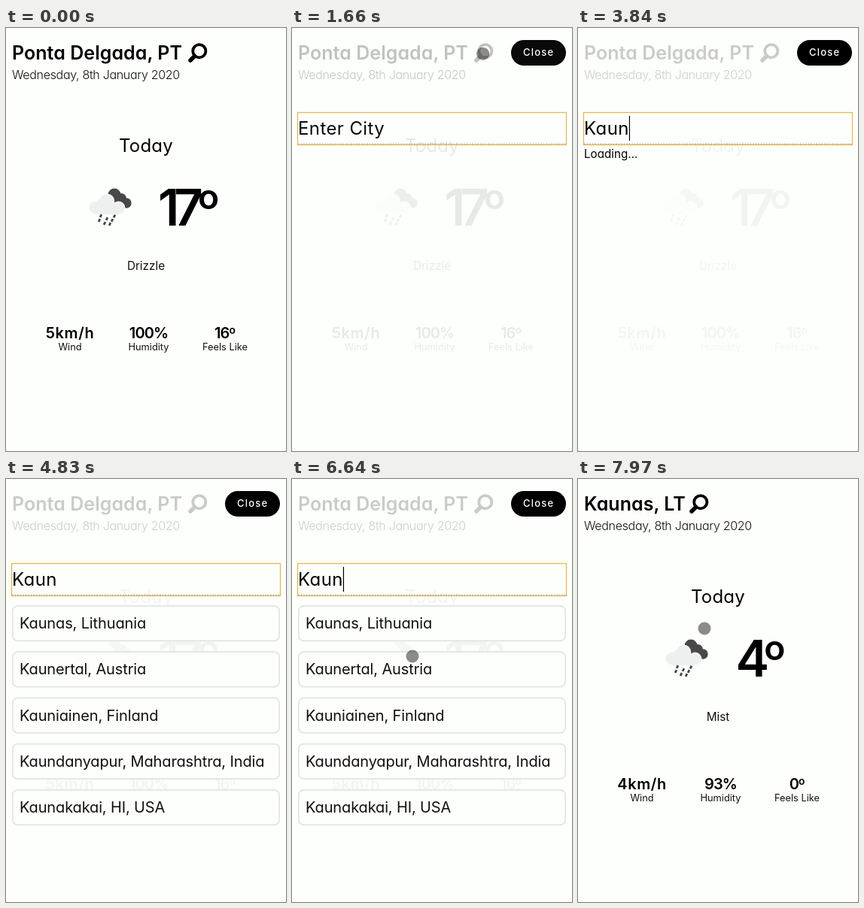
An HTML page that plays this animation: 372 by 563 pixels, repeating every 8000 ms.

```html
<!DOCTYPE html>
<html lang="en">
<head>
<meta charset="utf-8">
<title>Weather</title>
<style>
  html, body { margin: 0; width: 100%; height: 100%; overflow: hidden; background: #fdfffc; }
  svg { display: block; width: 372px; height: 563px; }
  text { font-family: Inter, "Open Sans", sans-serif; font-feature-settings: "cv11"; white-space: pre; }
</style>
</head>
<body>
<svg id="stage" viewBox="0 0 372 563">
  <defs>
    <radialGradient id="halo">
      <stop offset="0" stop-color="#aaa" stop-opacity=".4"/>
      <stop offset=".45" stop-color="#777" stop-opacity=".55"/>
      <stop offset=".62" stop-color="#bbb" stop-opacity=".7"/>
      <stop offset=".84" stop-color="#888" stop-opacity=".6"/>
      <stop offset="1" stop-color="#aaa" stop-opacity="0"/>
    </radialGradient>
  </defs>
  <g id="header"></g>
  <g id="main"></g>
  <g id="search"></g>
  <circle id="press" cx="254" cy="34" r="21" fill="url(#halo)"/>
  <circle id="pointer" r="8.5" fill="#000" fill-opacity=".45"/>
</svg>
<script>
const LOOP = 8000;
const PAPER = '#fdfffc';
const $ = id => document.getElementById(id);

const text = (x, y, content, size, { weight = 400, spacing = 0, anchor = 'start', fill = '#000', id = '' } = {}) =>
  `<text id="${id}" x="${x}" y="${y}" font-size="${size}" font-weight="${weight}" letter-spacing="${spacing}" text-anchor="${anchor}" fill="${fill}">${content}</text>`;
const centered = (x, y, content, size, options = {}) => text(x, y, content, size, { anchor: 'middle', ...options });
const degrees = n => `${n}<tspan font-size=".69em" dy="-.47em" letter-spacing="0">o</tspan>`;
const circles = list => list.map(([x, y, r]) => `<circle cx="${x}" cy="${y}" r="${r}"/>`).join('');

const cloud = x => {
  const front = circles([[119, 239, 8.3], [134, 230.5, 9.5], [126, 234, 6.5], [149.5, 239.5, 8.3]]) +
    '<rect x="119" y="234" width="30" height="13.8"/>';
  const drops = [[126, 250], [124, 256], [134, 254], [131, 260], [144, 250.5], [141, 256], [138, 261]]
    .map(([dx, dy]) => `M${dx + .9} ${dy - 1.8}l-1.8 3.6`).join('');
  return `<g transform="translate(${x - 111})">
    <g fill="#484848">${circles([[144, 222, 8.5], [153, 227, 7], [160, 233, 6.7], [152, 232, 8]])}</g>
    <g fill="${PAPER}" stroke="${PAPER}" stroke-width="1.2">${front}</g>
    <g fill="#eeefef">${front}</g>
    <path d="${drops}" stroke="#444" stroke-width="2.8"/></g>`;
};

const stat = (x, value, label, spacing = -.9) =>
  centered(x, 413, value, 20, { weight: 600, spacing }) +
  centered(x, 429, label, 12.8, { fill: '#111' });

const cities = [
  { name: 'Ponta Delgada, PT', iconX: 242, cloudX: 111, temp: 17, sky: 'Drizzle', wind: 5, humidity: 100, feels: 16 },
  { name: 'Kaunas, LT', iconX: 148, cloudX: 117, temp: 4, sky: 'Mist', wind: 4, humidity: 93, feels: 0 }
];

function showCity(c) {
  $('header').innerHTML =
    text(8, 42, c.name, 25, { weight: 600, spacing: .05 }) +
    text(8, 68, 'Wednesday, 8th January 2020', 16, { weight: 300, spacing: -.32, fill: '#111' }) +
    `<g transform="translate(${c.iconX} 20)" fill="none" stroke="#000">
      <circle cx="14.8" cy="10.7" r="8.6" stroke-width="3.8"/>
      <path d="M8.5 17.5L3 23" stroke-width="5.5" stroke-linecap="round"/></g>`;
  $('main').innerHTML =
    centered(186, 165, 'Today', 24, { spacing: .2 }) +
    cloud(c.cloudX) +
    centered(242.5, 263, degrees(c.temp), 67, { weight: 560, spacing: -7 }) +
    centered(186, 322, c.sky, 15.3, { fill: '#111' }) +
    stat(85, c.wind + 'km/h', 'Wind', .6) +
    stat(189.5, c.humidity + '%', 'Humidity') +
    stat(291, degrees(c.feels), 'Feels Like');
}

const matches = ['Kaunas, Lithuania', 'Kaunertal, Austria', 'Kauniainen, Finland',
  'Kaundanyapur, Maharashtra, India', 'Kaunakakai, HI, USA'];

$('search').innerHTML =
  '<rect x="291" y="16" width="73" height="34" rx="17"/>' +
  text(307, 37.3, 'Close', 13, { weight: 500, spacing: 1.2, fill: '#fff' }) +
  '<path d="M8 154.3H364" stroke="#99a" stroke-dasharray="2 1.5"/>' +
  '<rect x="7.5" y="112.5" width="357" height="43" fill="none" stroke="#e6b850" stroke-width="1.3"/>' +
  text(8, 142, '', 24, { id: 'query', spacing: .4 }) +
  '<rect id="caret" y="117" width="1.2" height="33"/>' +
  text(8, 173, 'Loading...', 15.2, { id: 'loading' }) +
  '<g id="results">' + matches.map((match, i) => {
    const y = 168 + i * 61.25;
    return `<rect x="8.8" y="${y + .8}" width="354.4" height="46.6" rx="7" fill="${PAPER}" stroke="#e2e4e3" stroke-width="1.7"/>` +
      text(18, y + 31, match, 20, { spacing: -.13, fill: '#111' });
  }).join('') + '</g>';

const keyTimes = [3300, 3450, 3640, 3840];
const pointerPath = [
  [100, 195, 574], [1030, 254, 34], [1650, 254, 34], [2050, 129, 135],
  [3040, 129, 135], [5330, 138, 154], [5770, 138, 154], [6600, 160, 236],
  [6780, 160, 236], [6970, 168, 199], [LOOP, 168, 199]
];

const ramp = (t, from, to) => {
  const p = Math.min(1, Math.max(0, (t - from) / (to - from)));
  return p * p * (3 - 2 * p);
};
const within = (t, from, to) => t >= from && t < to;
const show = (id, opacity) => $(id).setAttribute('opacity', +opacity);

function pointerAt(t) {
  const next = pointerPath.findIndex(point => point[0] > t);
  if (next < 1) return pointerPath[0].slice(1);
  const [t0, x0, y0] = pointerPath[next - 1], [t1, x1, y1] = pointerPath[next];
  const p = ramp(t, t0, t1);
  return [x0 + (x1 - x0) * p, y0 + (y1 - y0) * p];
}

let shownCity;
function draw(t) {
  const city = cities[t < 7350 ? 0 : 1];
  if (city !== shownCity) showCity(shownCity = city);

  const open = ramp(t, 1250, 1720) - ramp(t, 7350, 7950);
  show('header', 1 - .8 * open);
  show('main', 1 - .96 * open);
  show('search', open);

  const typed = 'Kaun'.slice(0, keyTimes.filter(k => t >= k).length);
  $('query').textContent = typed || 'Enter City';
  $('caret').setAttribute('x', 8 + (typed ? $('query').getComputedTextLength() : 0));
  show('caret', within(t, 2540, 3040) || within(t, 3300, 4830) || within(t, 5830, 7350));
  show('loading', within(t, 3300, 4010));
  show('results', t >= 4010);

  const [x, y] = pointerAt(t);
  $('pointer').setAttribute('transform', `translate(${x} ${y})`);
  show('pointer', t >= 100 && !within(t, 3040, 5330));
  show('press', ramp(t, 980, 1080) - ramp(t, 1230, 1450));
}

function tick() {
  draw(performance.now() % LOOP);
  requestAnimationFrame(tick);
}
tick();
</script>
</body>
</html>
```
